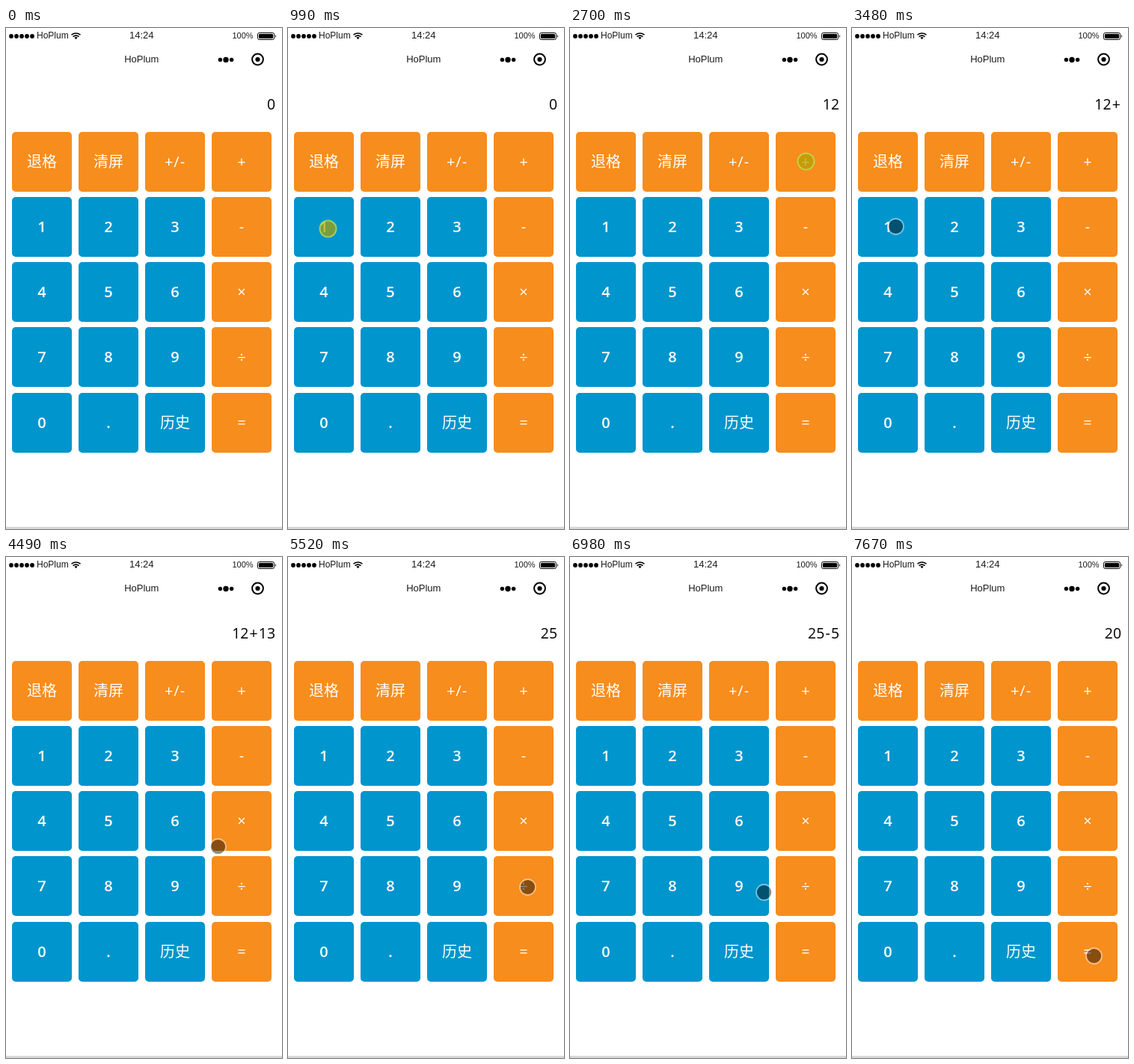
An HTML page for the animation above (7990 ms loop, 369 by 670 pixels).

```html
<!DOCTYPE html>
<html lang="zh">
<head>
<meta charset="utf-8">
<title>Calculator</title>
<style>
  html, body { margin: 0; width: 100%; height: 100%; overflow: hidden; background: #fff; }
  #stage { position: absolute; left: 0; top: 0; width: 369px; height: 670px; overflow: hidden; }
  svg { position: absolute; left: 0; top: 0; }
  .bar { font-family: "Liberation Sans", Arial, sans-serif; fill: #1a1a1a; }
  .key { font: 20px "Open Sans", "Noto Sans CJK SC", "Noto Sans CJK", sans-serif; fill: #fff; text-anchor: middle; }
  .digit { font-weight: 600; }
  #display {
    position: absolute; right: 9px; top: 87.5px; line-height: 28px; white-space: pre; color: #000;
    font-family: "Open Sans", sans-serif; font-size: 19.4px;
  }
  #display span { padding: 0 1.2px; }
</style>
</head>
<body>
<div id="stage">
  <svg width="369" height="670" viewBox="0 0 369 670">
    <g id="signal"></g>
    <text class="bar" x="41" y="14" font-size="12">HoPlum</text>
    <g fill="none" stroke="#000" stroke-width="1.6">
      <path d="M87.5 9.2Q93.5 4.8 99.5 9.2"/>
      <path d="M89.5 11.6Q93.5 8.6 97.5 11.6"/>
    </g>
    <path d="M91.4 12.8Q93.5 11.2 95.6 12.8L93.5 15.2Z"/>
    <text class="bar" x="181.3" y="14" font-size="13" text-anchor="middle">14:24</text>
    <text class="bar" x="302.5" y="14" font-size="11">100%</text>
    <rect x="336.5" y="6.5" width="22" height="9" rx="2" fill="none" stroke="#000"/>
    <rect x="338" y="8" width="19" height="6" rx="1"/>
    <path d="M360 9Q362 11 360 13Z"/>
    <text class="bar" x="181.3" y="46" font-size="13" text-anchor="middle">HoPlum</text>
    <circle cx="286.4" cy="42.5" r="2.7"/>
    <circle cx="294" cy="42.5" r="3.7"/>
    <circle cx="301.6" cy="42.5" r="2.7"/>
    <circle cx="336.5" cy="42" r="7.4" fill="none" stroke="#000" stroke-width="2"/>
    <circle cx="336.5" cy="42" r="3.1"/>
    <g id="keys"></g>
    <rect y="667" width="369" height="3" fill="#d9d9d9"/>
  </svg>
  <div id="display">0</div>
  <svg width="369" height="670" viewBox="0 0 369 670">
    <g id="pointer"><circle id="disc"/><circle id="ring" fill="none"/></g>
  </svg>
</div>
<script>
const LOOP = 7990, START = 140, TICK = 77.66, HOLD = 3;
const $ = id => document.getElementById(id);

function setAttrs(el, attrs) {
  for (const name in attrs) el.setAttribute(name, attrs[name]);
}

function add(parent, tag, attrs, text = "") {
  const el = document.createElementNS("http://www.w3.org/2000/svg", tag);
  setAttrs(el, attrs);
  el.textContent = text;
  parent.appendChild(el);
}

for (let i = 0; i < 5; i++) add($("signal"), "circle", { cx: 7 + i * 7, cy: 11, r: 2.9 });

const rows = ["退格 清屏 +/- +", "1 2 3 -", "4 5 6 ×", "7 8 9 ÷", "0 . 历史 ="];
rows.forEach((row, r) => row.split(" ").forEach((label, c) => {
  const x = 8 + 89 * c, y = Math.floor(139 + 87.25 * r);
  const orange = r === 0 || c === 3;
  add($("keys"), "rect", { x, y, width: 80, height: 80, rx: 5, fill: orange ? "#f78d1d" : "#0095cd" });
  add($("keys"), "text", {
    class: /[\d.]/.test(label) ? "key digit" : "key", x: x + 40, y: y + 47,
    "letter-spacing": label === "+/-" ? 1 : 0
  }, label);
}));

// Pointer stops, times in ticks; the stop without a key is a pause on the way
const home = { x: 268, y: 668 };
const stops = [
  { key: "1", leave: 0, arrive: 7, tap: 13, x: 53, y: 268 },
  { key: "2", leave: 13, arrive: 15, tap: 21, x: 131, y: 270 },
  { key: "", leave: 22.5, arrive: 26.2, tap: 0, x: 305, y: 308 },
  { key: "+", leave: 27, arrive: 33, tap: 35, x: 315, y: 178 },
  { key: "1", leave: 37, arrive: 43, tap: 47, x: 58, y: 265 },
  { key: "3", leave: 47, arrive: 50, tap: 53, x: 223, y: 265 },
  { key: "=", leave: 55, arrive: 57.75, tap: 63, x: 323, y: 530 },
  { key: "-", leave: 67, arrive: 74, tap: 77, x: 316, y: 271 },
  { key: "5", leave: 80, arrive: 83, tap: 86, x: 144, y: 358 },
  { key: "=", leave: 86, arrive: 91, tap: 96, x: 323, y: 533 }
];

// Glides slow down towards the stop, and the vertical part lags behind
function place(k) {
  let { x, y } = home;
  for (const s of stops) {
    const u = Math.min(1, Math.max(0, (k - s.leave) / (s.arrive - s.leave)));
    const f = 1 - (1 - u) ** 2;
    x += (s.x - x) * f;
    y += (s.y - y) * f ** 1.5;
  }
  return [Math.round(x) + 0.5, Math.round(y) + 0.5];
}

function press(text, key) {
  if (key === "=") return String(text.match(/[-+]?\d+/g).reduce((sum, n) => sum + Number(n), 0));
  return text === "0" ? key : text + key;
}

let shown = null;
function draw() {
  const t = performance.now() % LOOP;
  const k = Math.floor((t - START) / TICK + 0.19);
  if (k !== shown) {
    shown = k;
    const down = stops.some(s => k >= s.tap - HOLD && k < s.tap);
    const reading = stops.filter(s => s.key && k >= s.tap).reduce((text, s) => press(text, s.key), "0");
    $("display").innerHTML = reading.replace(/[-+]/g, "<span>$&</span>");
    $("pointer").style.display = k < 0 ? "none" : "";
    $("pointer").setAttribute("transform", `translate(${place(k)})`);
    setAttrs($("disc"), down
      ? { r: 10.5, fill: "rgba(177,161,0,.7)" }
      : { r: 9.8, fill: "rgba(0,0,0,.45)" });
    setAttrs($("ring"), down
      ? { r: 11, stroke: "rgba(190,220,80,.8)", "stroke-width": 2 }
      : { r: 10.5, stroke: "rgba(255,255,255,.45)", "stroke-width": 1.8 });
  }
  requestAnimationFrame(draw);
}
draw();
</script>
</body>
</html>
```
